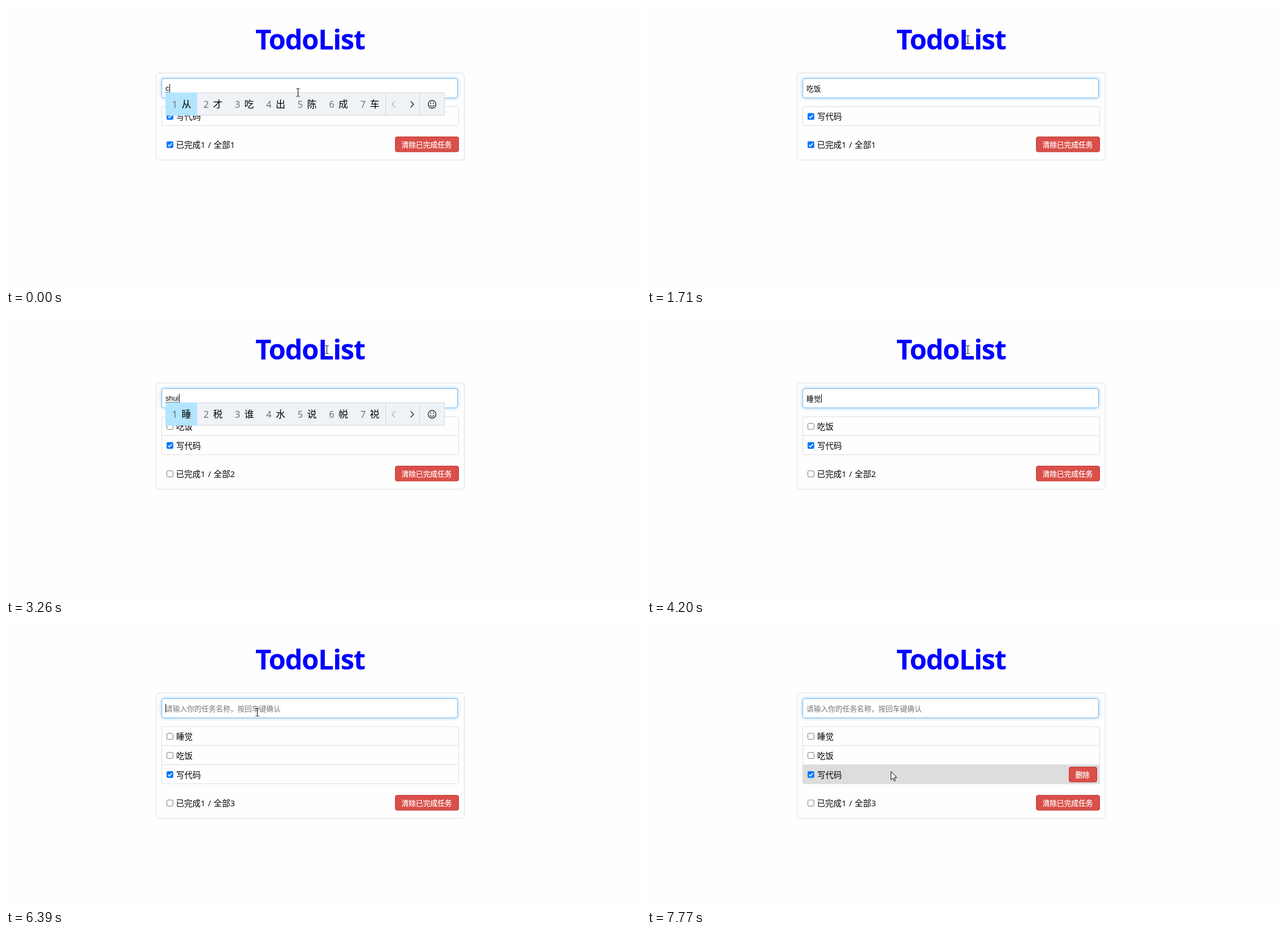
Animation of 1123 by 499 pixels, one loop 8000 ms. Source, as an HTML page:

```html
<!DOCTYPE html>
<html lang="zh-CN">
<head>
<meta charset="utf-8">
<title>TodoList</title>
<style>
html, body { margin: 0; width: 100%; height: 100%; overflow: hidden; background: #fefefe; }
svg { display: block; }
text { font: 14.56px "Open Sans", "Noto Sans CJK SC", "Noto Sans CJK", sans-serif; white-space: pre; }
.title { font-size: 49px; font-weight: 700; letter-spacing: -1.4px; fill: #00f; }
.frame { fill: none; stroke: #ddd; }
.input { fill: #fff; stroke: #75b9f0; filter: drop-shadow(0 0 3.4px rgba(82, 168, 236, .6)); }
.entry { font: 12.74px "Liberation Sans", Arial, "Noto Sans CJK SC", "Noto Sans CJK", sans-serif; }
.hint { font-size: 12.74px; fill: #757575; }
.total { word-spacing: 1px; }
.btn rect { fill: #da4f49; stroke: #bd362f; }
.btn text { font-size: 12.74px; font-weight: 500; fill: #fff; stroke: #fff; stroke-width: .25px; }
.cand { font-size: 17px; }
.num { font-size: 16.5px; fill: #666; }
.line { fill: none; stroke: #000; }
</style>
</head>
<body>
<svg width="1123" height="499" viewBox="0 0 1123 499">
  <text class="title" x="441" y="77">TodoList</text>
  <g id="list"></g>
  <rect class="input" x="275.5" y="128.5" width="523" height="34" rx="3.6"/>
  <g id="field"></g>
  <rect id="caret" y="138" width="1" height="15"/>
  <g id="ime"></g>
  <g id="mouse"></g>
</svg>
<script>
const LOOP = 8000, ROW = 34, LEFT = 282;
const TASKS = ['写代码', '吃饭', '睡觉'];
const HINT = '请输入你的任务名称，按回车键确认';
const $ = id => document.getElementById(id);

// Each step changes part of the state; the rest carries over.
const steps = [
  [0, { n: 1, text: 'c', cand: '从 才 吃 出 陈 成 车', edge: 776, caret: 1, mouse: [516.5, 153] }],
  [150, { text: 'chi', cand: '吃 持 池 尺 迟 齿 赤' }],
  [430, { text: "chi'f", cand: '吃饭 吃法 吃粉 赤峰 持反 迟非 齿缝', edge: 891 }],
  [550, { text: "chi'fa", cand: '吃法 吃饭 持法 吃发 池发 迟发 赤发' }],
  [670, { text: "chi'fan", cand: '吃饭 吃饭了 吃饭吧 吃饭去 吃饭了吗 吃饭没有', edge: 935 }],
  [1070, { text: '吃饭', cand: '' }],
  [1190, { mouse: [524.5, 126] }],
  [1310, { mouse: [543.5, 95.5] }],
  [1440, { mouse: [560.5, 70.5] }],
  [1560, { mouse: [567.5, 60.5], caret: 0 }],
  [1710, { mouse: [567.5, 59.5] }],
  [1860, { n: 2, text: '' }],
  [2140, { caret: 1 }],
  [2570, { caret: 0 }],
  [2840, { text: 's', cand: '是 上 说 三 所 岁 四', edge: 776, caret: 1 }],
  [2990, { text: 'sh', cand: '是 上 说 时候 什么 水 谁', edge: 812 }],
  [3260, { text: 'shui', cand: '睡 税 谁 水 说 帨 祱', edge: 776 }],
  [3380, { text: "shui'j", cand: '睡觉 水晶 水井 税金 水军 水饺 水几', edge: 891 }],
  [3770, { text: "shui'jiao", cand: '睡觉 水饺 睡觉了 睡觉吧 睡觉了吗 睡觉时间', edge: 939 }],
  [4200, { text: '睡觉', cand: '' }],
  [4450, { n: 3, text: '' }],
  [4570, { mouse: [568.5, 56.5] }],
  [4820, { mouse: [570.5, 53.5] }],
  [4940, { mouse: [570.5, 52.5], caret: 0 }],
  [5340, { caret: 1 }],
  [5620, { mouse: [569.5, 54.5] }],
  [5770, { mouse: [563.5, 70.5] }],
  [5890, { mouse: [553.5, 92.5], caret: 0 }],
  [6030, { mouse: [520, 122] }],
  [6150, { mouse: [480.5, 143.5] }],
  [6270, { mouse: [455.5, 150.5] }],
  [6390, { mouse: [444.5, 152.5], caret: 1 }],
  [6540, { mouse: [441, 186] }],
  [6660, { mouse: [437, 215] }],
  [6780, { mouse: [435, 212] }],
  [6900, { mouse: [434, 193], caret: 0 }],
  [7150, { mouse: [433, 216] }],
  [7270, { mouse: [432, 231], caret: 1 }],
  [7530, { mouse: [432, 247] }],
  [7650, { mouse: [431, 253] }],
  [7770, { mouse: [431, 257], caret: 0 }]
];
let last = {};
const states = steps.map(([, change]) => last = { ...last, ...change });

const text = (x, y, str, cls = '') => `<text x="${x}" y="${y}" class="${cls}">${str}</text>`;
const line = (d, color, width = 1) => `<path class="line" d="${d}" style="stroke:${color};stroke-width:${width}"/>`;

function box(y, on) {
  return on
    ? `<rect x="284" y="${y - 5.9}" width="11.8" height="11.8" rx="2" fill="#0075ff"/>` +
      line(`M286.6 ${y + .2}l2.4 2.5 4.4-5.2`, '#fff', 1.7)
    : `<rect x="284.5" y="${y - 5.4}" width="10.8" height="10.8" rx="2" fill="#fff" stroke="#767676"/>`;
}

function button(x, y, w, label) {
  return `<g class="btn"><rect x="${x + .5}" y="${y + .5}" width="${w}" height="26.5" rx="3.2"/>
    ${text(x + 11.4, y + 18.5, label)}</g>`;
}

function drawList({ n, mouse }) {
  const grow = (n - 1) * ROW;
  const hover = mouse[1] < 178 ? -1 : Math.floor((mouse[1] - 178) / ROW);
  let out = `<rect class="frame" x="265.5" y="118.5" width="545" height="${154 + grow}" rx="4.5"/>
    <rect class="frame" x="275.5" y="178" width="525" height="${33.7 * n}" rx="1.8"/>`;
  TASKS.slice(0, n).reverse().forEach((name, i) => {
    const top = 178 + i * 33.75;
    if (i) out += line(`M276 ${177.5 + i * ROW}H800`, '#ddd');
    if (i === hover) out += `<rect x="275.5" y="${top}" width="525" height="34" fill="#ddd"/>`;
    out += box(top + 17.3, name === TASKS[0]) + text(301, top + 23, name);
    if (i === hover) out += button(746, Math.round(top) + 3, 49, '删除');
  });
  return out + box(245.3 + grow, n === 1) + text(300.5, 250.5 + grow, `已完成1 / 全部${n}`, 'total') +
    button(688, 231 + grow, 112, '清除已完成任务');
}

function drawIme({ cand, edge }) {
  if (!cand) return '';
  let x = LEFT, items = '', first = 0;
  cand.split(' ').forEach((word, i) => {
    items += text(x + 11.8, 179.5, i + 1, 'num') + text(x + 28.6, 180, word, 'cand');
    x += 38.5 + 17 * word.length;
    first = first || x - LEFT;
  });
  const smile = edge - 22.5;
  return `<rect x="282.5" y="153.5" width="${edge - 283}" height="40" fill="#f0f3f6" stroke="#d3d7db"/>
    <rect x="282" y="153" width="${first + .5}" height="41" fill="#b3e5ff"/>` + items +
    line(`M${edge - 104.5} 154V193M${edge - 44.5} 154V193`, '#d3d7db') +
    line(`M${edge - 88} 168.5l-5.5 5.5 5.5 5.5`, '#aaa', 1.1) +
    line(`M${edge - 60.5} 168.5l5.5 5.5-5.5 5.5`, '#111', 1.2) +
    `<circle class="line" cx="${smile}" cy="174" r="6.8" style="stroke-width:1.2"/>
    <circle cx="${smile - 2.4}" cy="172" r="1"/><circle cx="${smile + 2.4}" cy="172" r="1"/>` +
    line(`M${smile - 3.6} 175.6q3.6 4.4 7.2 0`, '#000', 1.1);
}

function drawMouse([x, y]) {
  const arrow = y > 163 || (y > 100 && y < 129);
  const shape = arrow
    ? '<path d="M.5.5V15.3L3.9 12.2 6.2 17.2 8.3 16.3 6.1 11.2H10.7Z" fill="#fff" stroke="#000"/>'
    : line('M-3-7H-.7L0-6.3.7-7H3M0-6.5V6.5M-3 7H-.7L0 6.3.7 7H3', '#000');
  return `<g transform="translate(${x} ${y})">${shape}</g>`;
}

function render(s) {
  $('list').innerHTML = drawList(s);
  $('field').innerHTML = s.text ? text(LEFT, s.cand ? 150 : 151, s.text, 'entry') : text(LEFT, 150.6, HINT, 'hint');
  const end = LEFT + (s.text ? $('field').firstChild.getComputedTextLength() : 0);
  if (s.cand) $('field').innerHTML +=
    `<path d="M282 152.5H${end}" stroke="#000" stroke-dasharray="1 1"/>`;
  $('caret').setAttribute('x', Math.ceil(end));
  $('caret').style.display = s.caret ? '' : 'none';
  $('ime').innerHTML = drawIme(s);
  $('mouse').innerHTML = drawMouse(s.mouse);
}

const start = performance.now();
let shown = -1;
function tick() {
  const t = (performance.now() - start) % LOOP;
  const i = steps.findLastIndex(([at]) => at <= t);
  if (i !== shown) render(states[shown = i]);
  requestAnimationFrame(tick);
}
tick();
</script>
</body>
</html>
```
